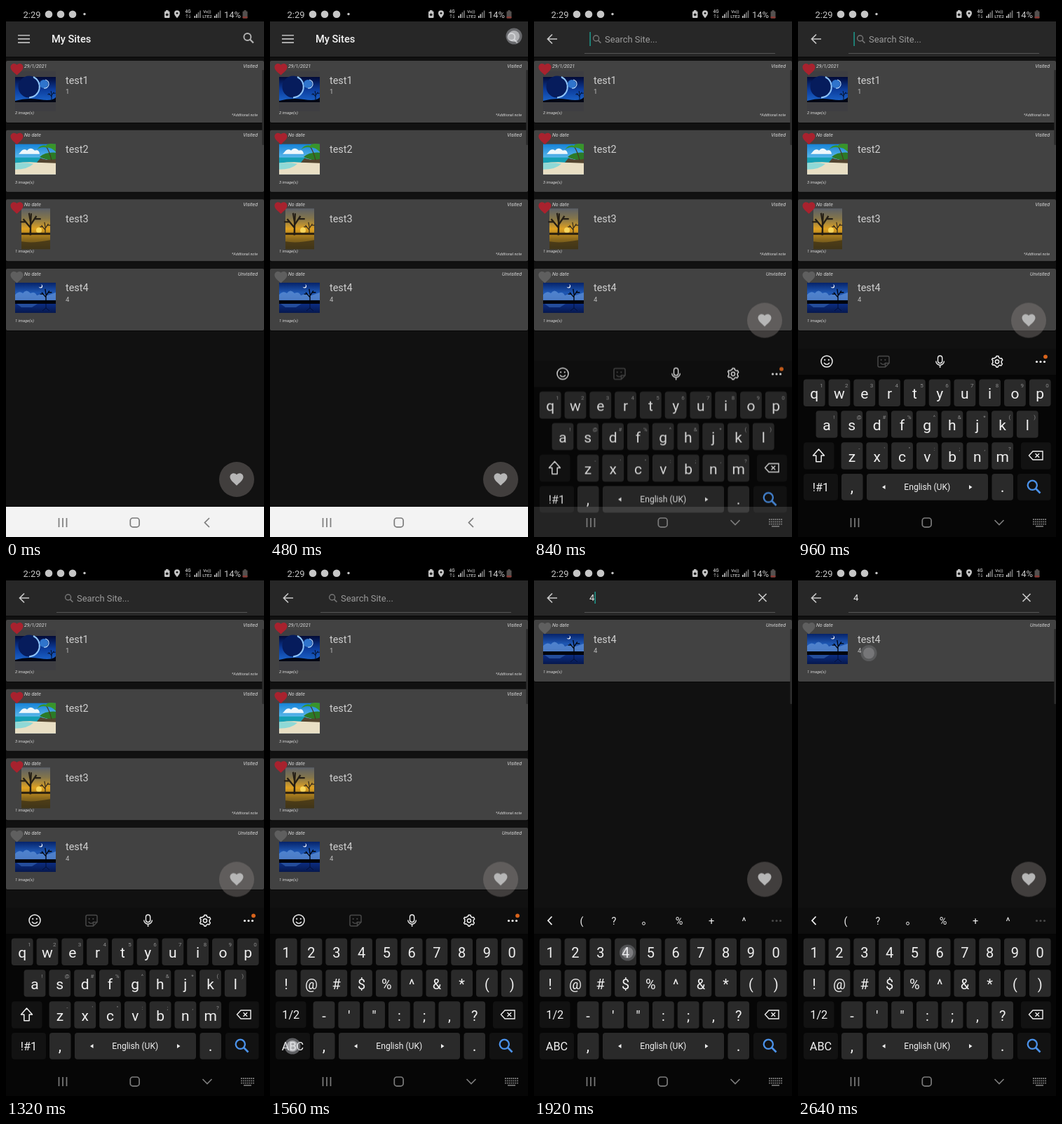
Recreate the animation shown at these times as an HTML page. Size 368 by 756 pixels, loop 2.76 s.

```html
<!DOCTYPE html>
<html lang="en">
<head>
<meta charset="utf-8">
<title>Site search</title>
<style>
html, body { margin: 0; width: 100%; height: 100%; overflow: hidden; background: #111; }
svg { display: block; width: 368px; height: 756px; font-family: Roboto, sans-serif; }
text { white-space: pre; }
</style>
</head>
<body>
<svg id="stage" viewBox="0 0 368 756" xmlns="http://www.w3.org/2000/svg"></svg>
<script>
const LOOP = 2760;

// Drawing helpers
const rect = (x, y, w, h, fill, r = 0) => `<rect x="${x}" y="${y}" width="${w}" height="${h}" rx="${r}" fill="${fill}"/>`;
const disc = (x, y, r, fill, more = '') => `<circle cx="${x}" cy="${y}" r="${r}" fill="${fill}" ${more}/>`;
const fill = (d, c, more = '') => `<path d="${d}" fill="${c}" ${more}/>`;
const line = (d, c, w = 1.5, more = '') => `<path d="${d}" fill="none" stroke="${c}" stroke-width="${w}" ${more}/>`;
const group = (id, body, more = '') => `<g id="${id}" ${more}>${body}</g>`;
const text = (x, y, size, str, c, more = '') =>
  `<text x="${x}" y="${y}" font-size="${size}" fill="${c}" ${more}>${str.replace('&', '&amp;')}</text>`;
const MID = 'text-anchor="middle"', END = 'text-anchor="end"', ITALIC = 'font-style="italic"';

const HEART = 'M12 21.35l-1.45-1.32C5.4 15.36 2 12.28 2 8.5 2 5.42 4.42 3 7.5 3c1.74 0 3.41.81 4.5 2.09C13.09 3.81 14.76 3 16.5 3 19.58 3 22 5.42 22 8.5c0 3.78-3.4 6.86-8.55 11.54z';
const heart = (x, y, s, c) => fill(HEART, c, `transform="translate(${x - 12 * s} ${y - 12.2 * s}) scale(${s})"`);
const lens = (x, y, r, c, w) => disc(x, y, r, 'none', `stroke="${c}" stroke-width="${w}"`) +
  line(`M${x + r * .72} ${y + r * .72}L${x + r * 1.7} ${y + r * 1.7}`, c, w * 1.15);
const dots = c => [340.5, 346, 351.5].map(x => disc(x, 506.5, 1.6, c)).join('');

// Status bar
function bars(x) {
  return [0, 1, 2, 3].map(i => rect(x + i * 2.6, 14 - i * 2.5, 1.6, 3 + i * 2.5, i < 2 ? '#c4c4c4' : '#777')).join('');
}
function statusBar() {
  const c = '#c6c6c6';
  return rect(0, 0, 368, 22, '#000') + text(24.5, 16.5, 13, '2:29', c) +
    [61, 78, 95].map(x => disc(x, 11.8, 5.3, c)).join('') + disc(112, 11.5, 1.7, c) +
    rect(226, 7.5, 7.5, 9.5, c, 1.2) + rect(228, 6, 3.5, 2, c) + disc(229.7, 12.3, 1.9, '#222') +
    fill('M244 17.3c-2.4-3-4-4.7-4-7a4 4 0 0 1 8 0c0 2.300-1.600 4-4 7z', c) + disc(244, 10.3, 1.4, '#111') +
    text(259.5, 10, 6.5, '4G', c, MID + ' font-weight="500"') +
    line('M258 17v-5m-1.500 1.500l1.500-1.500l1.500 1.500M262 12v5m-1.500-1.500l1.500 1.500l1.500-1.500', '#999', .8) +
    bars(268.5) + text(287, 10, 6, 'Vo))', c, MID + ' font-weight="500"') +
    text(287, 17, 6.2, 'LTE2', c, MID + ' font-weight="500"') + bars(297) +
    text(311, 16.5, 13, '14%', c) +
    rect(337.5, 7.5, 7, 10, '#54504f', 1) + rect(339.5, 6, 3, 2, '#54504f') + rect(337.5, 15, 7, 2.5, '#8a3a35', 1);
}

// Thumbnails, placed relative to the card top
function tree(x, y, s, c) {
  return line('M0 0V-9M0 -5L-5 -11M0 -7L4 -13M0 -9L-1 -15M-3 -9L-7 -9M3 -11L7 -11', c, 1.1,
    `transform="translate(${x} ${y}) scale(${s})"`);
}
const photos = [
  rect(13, 15, 58, 57, '#3e3e42') + rect(13, 23, 58, 36, 'url(#night)') +
    disc(33, 37, 15.5, '#061c5c') + line('M39 23a15.500 15.500 0 0 1-6 29.500', '#8fc4f8', 2) +
    disc(54, 33, 6, '#2f74cc') + line('M56 27a6 6 0 0 1-2 12', '#b9dcff', 1.2) +
    fill('M13 57Q30 52 48 55T71 52V59H13z', '#020614') + tree(65, 55, .8, '#020614'),
  rect(13, 20, 58, 43, 'url(#sky)') +
    fill('M20 32q5-7 10-3q5-6 11 0q6-2 7 5H18z', '#eef7fb') +
    rect(13, 39, 38, 8, '#159fb4') +
    fill('M13 47Q30 45 44 46L71 45V63H13z', '#e9dfc4') + fill('M13 47q15-1 26 1q-8 8-26 8z', '#8fd9d6') +
    fill('M44 46l5-6l9 2l13-4v9z', '#54452f') + fill('M48 38q8-7 23-6v9q-12 3-23-3z', '#2c7a27') +
    line('M65 43Q62 30 57 23', '#4a3a22', 1.2) +
    fill('M44 28Q50 20 57 22Q60 18 71 20V31Q64 24 58 25Q50 23 44 28z', '#39942b'),
  rect(22, 13, 41, 58, 'url(#dusk)') + disc(47, 44, 4, '#ffe36a', 'opacity=".8"') +
    rect(22, 47.5, 41, 3, '#2b210f') + fill('M22 71V60Q38 63 63 58V71z', '#3c3116', 'opacity=".75"') +
    tree(35, 51, 2.1, '#251f16') + line('M34.500 51L36 20', '#251f16', 2) + tree(56, 49, 1.1, '#332a1c'),
  rect(13, 20, 58, 43, 'url(#lake)') +
    fill('M13 45V37q6-6 11-2q5-7 11 0q6-3 9 3q9-4 15 0l12-4V45z', '#5b8dd4', 'opacity=".8"') +
    disc(49.5, 25, 2.6, '#f2f7ff') + disc(48.7, 24.2, 2.3, '#0b2d79') +
    rect(13, 45, 58, 5, '#01040d') + tree(57, 47, 1.2, '#01040d') +
    fill('M15 50h30l-8 5H22z', '#3566b4', 'opacity=".6"') + line('M57 50v6l-5 4m5-4l5 4', '#03103a', 1)
];

const sites = [
  { date: '29/1/2021', state: 'Visited', sub: '1', images: 2, note: true },
  { date: 'No date', state: 'Visited', sub: '', images: 3 },
  { date: 'No date', state: 'Visited', sub: '', images: 1, note: true },
  { date: 'No date', state: 'Unvisited', sub: '4', images: 1 }
];
function card(i, y) {
  const s = sites[i], c = '#d8d8d8';
  return `<g transform="translate(0 ${y})">` +
    rect(0, .8, 368, 88.2, '#080808', 2) + rect(0, 0, 368, 88, '#424242', 2) + photos[i] +
    heart(15.5, 12.3, .9, s.state === 'Visited' ? '#a8222e' : '#5f5f5f') +
    text(26, 9.6, 7, s.date, c, ITALIC) + text(359, 9.6, 7, s.state, c, ITALIC + ' ' + END) +
    text(85, 32.5, 14.4, `test${i + 1}`, '#cfcfcf') + text(85, 47, 9.5, s.sub, '#bdbdbd') +
    text(13, 76, 5.8, `${s.images} image(s)`, c, ITALIC) +
    (s.note ? text(359, 79.3, 5.5, '*Addtional note', c, ITALIC + ' ' + END) : '') + '</g>';
}

// App bars
const titleBar = ['M17 41.700h17M17 46.900h17M17 52.100h17'].map(d => line(d, '#bebebe', 1.6)).join('') +
  text(65, 52, 14.6, 'My Sites', '#f4f4f4', 'font-weight="500"') + lens(344.4, 44, 5, '#b4b4b4', 1.9);
const searchBar = line('M33 47H19.500M26 40.500L19.500 47L26 53.500', '#c9c9c9', 1.7) + rect(72, 67, 272, 1, '#555');
const hint = lens(88.6, 46, 4, '#777', 1.4) + text(101, 52.2, 12.9, 'Search Site...', '#9b9b9b');
const query = text(79, 51.3, 13, '4', '#e8e8e8') + line('M320.500 41l11 11m0-11l-11 11', '#c9c9c9', 1.7);

// Keyboard
const ROWS = [531.5, 576.2, 621.2, 666];
const PITCH = 35.78, LIGHT = '#2a2a2a', DARK = '#121212', INK = '#f0f0f0';
function keyRow(chars, first, y, size, tops = '') {
  return [...chars].map((ch, i) => {
    const x = first + i * PITCH;
    return rect(x - 15.4, y, 30.8, 38.6, LIGHT, 4) + text(x, y + 27.4, size, ch, INK, MID) +
      (tops ? text(x + 10.3, y + 11.6, 8, tops[i], '#8c8c8c', MID) : '');
  }).join('');
}
const wideKey = (y, w, label) => rect(8, y, w, 37.8, DARK, 4) + text(8 + w / 2, y + 24.6, 16.3, label, INK, MID);
const letters = keyRow('qwertyuiop', 23.2, ROWS[0], 21, '1234567890') +
  keyRow('asdfghjkl', 41, ROWS[1], 21, '!@#%^&*()') +
  keyRow('zxcvbnm', 77, ROWS[2], 21, '-\'":;,?') +
  rect(8, ROWS[2], 43.5, 38.6, DARK, 4) +
  line('M29.500 631l8 9h-4.300v8.800h-7.400v-8.800h-4.300z', INK, 1.5, 'stroke-linejoin="round"') +
  wideKey(ROWS[3], 49, '!#1');
const symbols = keyRow('1234567890', 23.2, ROWS[0], 20) + keyRow('!@#$%^&*()', 23.2, ROWS[1], 20) +
  keyRow('-\'":;,?', 77, ROWS[2], 20) + wideKey(ROWS[2], 43.5, '1/2') + wideKey(ROWS[3], 49, 'ABC');
const sharedKeys = rect(318, ROWS[2], 42.8, 38.6, DARK, 4) +
  line('M329.500 640l5.500-6h14v12h-14zM338.500 637.200l5.600 5.600m0-5.600l-5.600 5.600', INK, 1.4) +
  [[62, 30.5], [98, 173], [276.5, 30.5]].map(([x, w]) => rect(x, ROWS[3], w, 37.8, LIGHT, 4)).join('') +
  text(77, 692, 22, ',', INK, MID) + text(291.7, 692, 22, '.', INK, MID) +
  text(184.3, 689.2, 12.1, 'English (UK)', INK, MID) +
  fill('M124.500 682v6l-4.500-3zM244 682v6l4.500-3z', INK) +
  rect(313, ROWS[3], 47.6, 37.8, DARK, 4) + lens(334.3, 682.3, 6.6, '#4b92ea', 2.3);

function gear(x, y) {
  const pts = Array.from({ length: 48 }, (_, i) => {
    const a = i * Math.PI / 24, r = Math.cos(6 * a) > 0 ? 8 : 6.3;
    return `${(x + r * Math.sin(a)).toFixed(1)} ${(y - r * Math.cos(a)).toFixed(1)}`;
  });
  return line(`M${pts.join('L')}z`, INK, 1.5, 'stroke-linejoin="round"') + disc(x, y, 2.6, 'none', `stroke="${INK}" stroke-width="1.5"`);
}
const face = (x, c) => disc(x - 2.8, 503.8, 1.1, c) + disc(x + 2.8, 503.8, 1.1, c) +
  line(`M${x - 4} 508q4 4.600 8 0`, c, 1.3);
const tools = disc(41, 506, 8, 'none', `stroke="${INK}" stroke-width="1.500"`) + face(41, INK) +
  line('M116 498.500h12q2 0 2 2v8l-5.500 5.500h-8.500q-2 0-2-2v-11.500q0-2 2-2zM130 508.500h-5.500v5.500', '#484848', 1.5) + face(121.5, '#484848') +
  `<rect x="199.500" y="498" width="6.200" height="10.500" rx="3.100" fill="none" stroke="${INK}" stroke-width="1.400"/>` +
  line('M196.800 505.500a5.800 5.800 0 0 0 11.600 0M202.600 511.500v3.500', INK, 1.4) +
  gear(284, 506.3) + dots(INK) + disc(353, 499.3, 2.9, '#d9641c');
const suggestions = line('M25.500 500.500l-5.500 5.800l5.500 5.800', INK, 1.7) +
  [[68, '('], [114, '?'], [207, '%'], [253, '+'], [299.5, '^']].map(([x, s]) => text(x, 511.5, 14.5, s, INK, MID)).join('') +
  disc(156.5, 510.3, 2, 'none', `stroke="${INK}" stroke-width="1"`) + dots('#484848');

const keyboard = rect(0, 488, 368, 300, '#060606') + rect(0, 488, 368, 37, '#0e0e0e') + sharedKeys +
  group('letters', letters) + group('symbols', symbols) + group('tools', tools) + group('suggestions', suggestions);
const popup = rect(115.1, ROWS[0], 30.8, 38.6, '#5a5a5a', 4) + text(130.5, 558.9, 20, '4', INK, MID) +
  rect(103.5, 455, 55, 71, '#131313', 6) + text(131, 503, 30, '4', '#fff', MID);

// Navigation bar
const GREY = '#7c7c7c';
const navIcons = line('M75.500 729v13M81 729v13M86.500 729v13', GREY, 1.7) +
  `<rect x="177.300" y="729" width="12.800" height="12.800" rx="3.600" fill="none" stroke="${GREY}" stroke-width="1.700"/>`;
const imeIcons = line('M280.500 732l6.500 6.500l6.500-6.500', GREY, 1.7) +
  [731, 734.3, 737.6].map(y => line(`M335 ${y}h19`, GREY, 1.8, 'stroke-dasharray="1.800 1.070"')).join('') +
  line('M339 740.800h11', GREY, 1.6);

const touch = (id, x, y) => group(id, disc(x, y, 11.5, '#aeb0b8', 'opacity=".550"') + disc(x, y, 8, '#f4f4f8', 'opacity=".600"'));
const ramp = (id, ...stops) => `<linearGradient id="${id}" x2="0" y2="1">` +
  stops.map((c, i) => `<stop offset="${i / (stops.length - 1)}" stop-color="${c}"/>`).join('') + '</linearGradient>';

document.getElementById('stage').innerHTML = '<defs>' +
  ramp('night', '#030a36', '#0c3c9c', '#1c66cc') + ramp('sky', '#1683d8', '#63bdec', '#a8def2') +
  ramp('dusk', '#5c6068', '#85764a', '#e0a222', '#8d6a1c', '#4c421f') +
  ramp('lake', '#06236a', '#1f58b4', '#0c2f86', '#06184e') + '</defs>' +
  rect(0, 0, 368, 756, '#111') +
  group('all', [0, 1, 2, 3].map(i => card(i, 78 + i * 98.65)).join('')) + group('found', card(3, 78)) +
  rect(365.3, 91, 2.7, 107, '#2b2b2b', 1) +
  rect(0, 22, 368, 50, '#272727') + rect(0, 72, 368, 2, '#0c0c0c') + statusBar() +
  group('title', titleBar) + group('search', searchBar) + group('hint', hint) + group('query', query) +
  group('caret', rect(79.3, 37, 1.6, 20, '#1f9488')) + group('caret2', rect(86.4, 38, 1.6, 17, '#1f9488')) +
  group('fab', disc(329, 674, 25, '#968e8c', 'opacity=".370"') + heart(329, 674, .95, '#b6b6b6')) +
  group('keyboard', keyboard) + group('popup', popup) +
  group('nav', rect(0, 713, 368, 43, '#f3f3f3')) + navIcons +
  group('back', line('M290 729l-6.500 6.500l6.500 6.500', GREY, 1.7)) + group('ime', imeIcons) +
  touch('tapSearch', 348, 43) + touch('tapSym', 32, 685) + touch('tapFour', 133.5, 552) + touch('tapCard', 101, 125.5);

// Stepped timelines: [time in ms, value], each value held until the next
function play(id, prop, steps) {
  const frames = steps.map(([t, v]) => ({ offset: t / LOOP, [prop]: v, easing: 'step-end' }));
  frames.push({ offset: 1, [prop]: steps[steps.length - 1][1] });
  document.getElementById(id).animate(frames, { duration: LOOP, iterations: Infinity });
}
const shift = y => `translate(0px, ${y}px)`;
const opacity = {
  title: [[0, 1], [600, 0]],
  search: [[0, 0], [600, 1]],
  hint: [[0, 0], [600, 1], [1920, 0]],
  query: [[0, 0], [1920, 1]],
  caret: [[0, 0], [600, 1], [1200, 0], [1680, 1], [1920, 0]],
  caret2: [[0, 0], [1920, 1], [2400, 0]],
  all: [[0, 1], [1920, 0]],
  found: [[0, 0], [1920, 1]],
  keyboard: [[0, 0], [720, .45], [840, .88], [960, 1]],
  letters: [[0, 1], [1560, 0]],
  symbols: [[0, 0], [1560, 1]],
  tools: [[0, 1], [1920, 0]],
  suggestions: [[0, 0], [1920, 1]],
  popup: [[0, 0], [1800, 1], [1920, 0]],
  nav: [[0, 1], [720, .5], [840, .12], [960, 0]],
  back: [[0, 1], [600, 0]],
  ime: [[0, 0], [600, 1]],
  tapSearch: [[0, 0], [360, .45], [480, .9], [600, .3], [720, 0]],
  tapSym: [[0, 0], [1440, .6], [1560, .9], [1680, .3], [1800, 0]],
  tapFour: [[0, 0], [1800, .9], [1920, .55], [2040, .2], [2160, 0]],
  tapCard: [[0, 0], [2520, .2], [2640, .4]]
};
for (const id in opacity) play(id, 'opacity', opacity[id]);
play('keyboard', 'transform', [[0, shift(225)], [720, shift(120)], [840, shift(17.5)], [960, shift(0)]]);
play('fab', 'transform', [[0, shift(0)], [720, shift(-226.5)]]);
</script>
</body>
</html>
```
